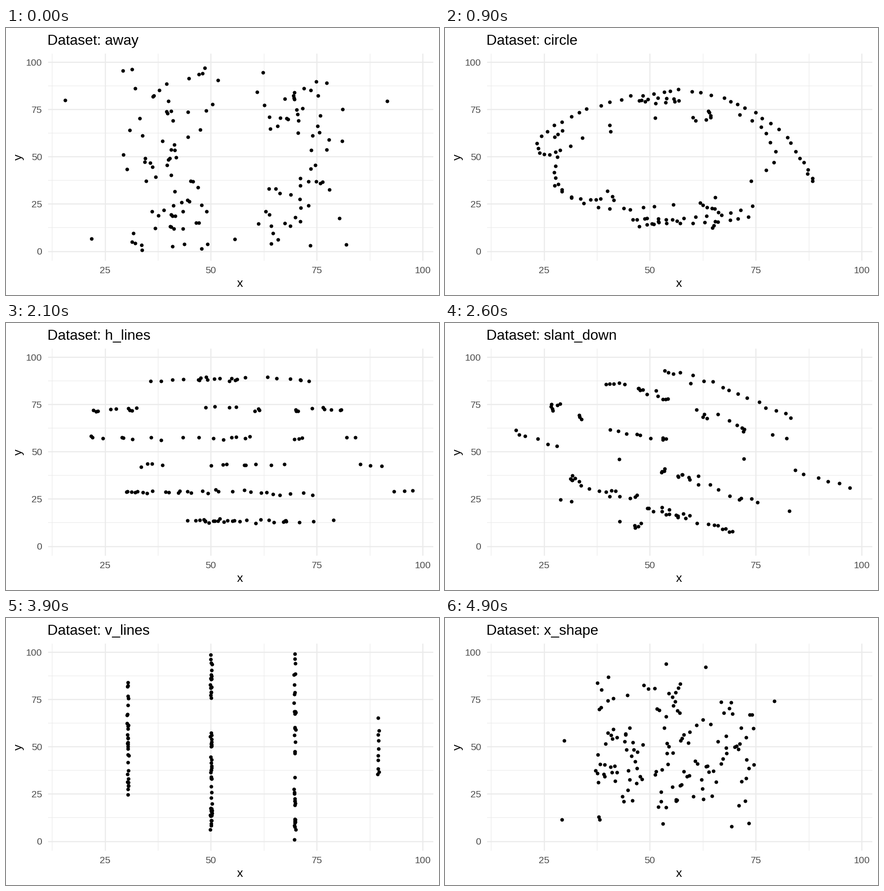
A matplotlib script that plays this animation: 952x588 px, repeating every 5 s.

```python
import numpy as np
import matplotlib.pyplot as plt
from matplotlib.animation import FuncAnimation

W, H, DPI = 952, 588, 100
N = 142
FONT = "Liberation Sans"
rng = np.random.default_rng(7)


def px(x):
    return 217.6 + (np.asarray(x) - 25) * 9.313


def py(y):
    return 491.5 - np.asarray(y) * 4.162


def noise(n, sx, sy):
    return np.clip(rng.normal(size=(n, 2)), -2, 2) * (sx, sy)


def curve(n, *keys):
    """n evenly spaced points on a smooth curve through the key points."""
    keys = np.array(keys, float)
    slope = np.gradient(keys, axis=0)
    t = np.linspace(0, len(keys) - 1, 400)
    i = np.minimum(t.astype(int), len(keys) - 2)
    u = (t - i)[:, None]
    path = (keys[i] * (1 + 2 * u) * (1 - u) ** 2 + slope[i] * u * (1 - u) ** 2
            + keys[i + 1] * u * u * (3 - 2 * u) + slope[i + 1] * u * u * (u - 1))
    dist = np.r_[0, np.hypot(*np.diff(path, axis=0).T).cumsum()]
    at = np.linspace(0, dist[-1], n)
    return np.column_stack([np.interp(at, dist, c) for c in path.T])


def ellipse(n, cx, cy, rx, ry):
    a = np.arange(n) * 2 * np.pi / n
    return np.column_stack([cx + rx * np.cos(a), cy + ry * np.sin(a)])


def make_dino():
    snout = curve(31, (55.4, 97.2), (38.7, 85), (23.2, 66.4), (24, 52.5),
                  (40, 51.4), (58, 57.5), (61.8, 69))
    mouth = curve(6, (57.4, 55.3), (48.2, 38.3))
    jaw = curve(11, (45.4, 36.4), (36, 30.3), (31.5, 37), (38.2, 49))
    arm = curve(21, (29.7, 36), (35, 25.6), (47, 28.5), (56.7, 42.2),
                (67.9, 48), (71.5, 62), (69.5, 69.5))
    eye = ellipse(11, 51.8, 82, 4.8, 4)
    nostril = curve(3, (29.7, 59.9), (31.3, 62.6))
    back = curve(21, (58, 99.5), (68.5, 94), (76, 76.5), (84, 53), (98.2, 33.7))
    belly = curve(6, (56.7, 40.6), (64.4, 24))
    legs = curve(12, (74.4, 22.9), (61.3, 19), (50, 17.7), (45, 13.7))
    toes = curve(4, (48.7, 14.9), (56.2, 14.1))
    claws = curve(4, (52, 12.6), (46.2, 6))
    ground = curve(9, (50.5, 9.8), (78.2, 10.6))
    heel = curve(3, (68, 8.7), (68.2, 2.9))
    return np.vstack([snout, mouth, jaw, arm, eye, nostril, back, belly, legs,
                      toes, claws, ground, heel])


def make_away():
    """Two loose columns around an empty middle, with a few strays."""
    pts = [(15.6, 80), (91.6, 79.4), (21.8, 6.6), (82, 3.5)]
    while len(pts) < N:
        left = rng.random() < 0.55
        x = rng.normal(41, 7) if left else rng.normal(70, 5.5)
        y = rng.uniform(0, 97.5)
        hole = np.hypot((x - 58) / 15, (y - 49) / 17) < 1
        if 28 < x < 82 and not hole:
            pts.append((x, y))
    return rng.permutation(np.array(pts))


def nearest(values, options):
    options = np.asarray(options, float)
    return options[np.abs(values[:, None] - options).argmin(1)]


def ring(pts, small, big):
    d = pts - (54.3, 47.8)
    r = np.hypot(*d.T)
    radius = np.where(r < 28, small, big)
    return (54.3, 47.8) + d * (radius / r)[:, None] + noise(N, 0.5, 0.5)


def dots(pts):
    x, y = pts.T
    cx = np.array([26, 51, 75.5])[np.digitize(x, [37.5, 62])]
    cy = np.array([17, 51, 83])[np.digitize(y, [34, 64])]
    far = np.maximum(y - cy - 7, 0) * (cy > 80)
    return np.column_stack([cx, cy + far]) + noise(N, 0.7, 0.7)


def h_lines(pts):
    x, y = pts.T
    return np.column_stack([x, nearest(y, 10.3 + 20 * np.arange(5))]) + noise(N, 0.8, 0.5)


def v_lines(pts):
    x, y = pts.T
    cols = nearest(x, 30.4 + 19.7 * np.arange(4))
    out = np.column_stack([cols, y]) + noise(N, 0.1, 1.5)
    out[:, 1] = np.minimum(out[:, 1], 99.7)
    return out


def high_lines(pts):
    x, y = pts.T
    band = np.where(y > 50, 70 + (y - 50) * 0.35, 30 - (50 - y) * 0.27)
    return np.column_stack([x, band]) + noise(N, 0.8, 1)


def wide_lines(pts):
    x, y = pts.T
    band = np.where(x < 53, 42 - (53 - x) * 0.42, 64 + (x - 53) * 0.3)
    out = np.column_stack([band, y]) + noise(N, 1.2, 1.5)
    out[:, 1] = np.clip(out[:, 1], 0.2, 99.7)
    return out


def slant(pts, sign, offsets):
    """Drop each point on the closest line y = sign * x + c."""
    x, y = pts.T
    c = nearest(y - sign * x, offsets)
    ny = (y + sign * x + c) / 2
    ny = np.where(ny > 88, 88 + (ny - 88) * 0.75, ny)
    return np.column_stack([sign * (ny - c), ny]) + noise(N, 0.5, 0.8)


def on_segments(pts, a, b, sx, sy):
    """Closest point on any of the segments a-b."""
    d = b - a
    t = ((pts[:, None] - a) * d).sum(2) / (d * d).sum(1)
    near = a + np.clip(t, 0, 1)[..., None] * d
    pick = np.hypot(*np.moveaxis(pts[:, None] - near, 2, 0)).argmin(1)
    return near[np.arange(N), pick] + noise(N, sx, sy)


def star(pts):
    a = np.pi / 2 + np.arange(10) * np.pi / 5
    r = np.where(np.arange(10) % 2, 0.42, 1)
    v = np.column_stack([57 + 31 * r * np.cos(a), 49 + 43 * r * np.sin(a)])
    return on_segments(pts, v, np.roll(v, -1, 0), 0.5, 0.5)


def x_shape(pts):
    a = np.array([[32.0, 93], [32, 5]])
    b = np.array([[78.0, 9], [79, 92]])
    return on_segments(pts, a, b, 1.3, 2)


dino = make_dino()
STATES = [
    ("away", make_away()),
    ("bullseye", ring(dino, 18.7, 37.1)),
    ("circle", ring(dino, 31, 31)),
    ("dino", dino),
    ("dots", dots(dino)),
    ("h_lines", h_lines(dino)),
    ("high_lines", high_lines(dino)),
    ("slant_down", slant(dino, -1, [52, 71, 100, 130, 150])),
    ("slant_up", slant(dino, 1, [-49, -30, 0, 30, 48])),
    ("star", star(dino)),
    ("v_lines", v_lines(dino)),
    ("wide_lines", wide_lines(dino)),
    ("x_shape", x_shape(dino)),
]

fig = plt.figure(figsize=(W / DPI, H / DPI), dpi=DPI, facecolor="white")
ax = fig.add_axes([0, 0, 1, 1])
ax.set(xlim=(0, W), ylim=(H, 0))
ax.axis("off")


def pt(pixels):
    return pixels * 72 / DPI


def label(x, y, text, size, color="black", **kw):
    return ax.text(x, y, text, family=FONT, fontsize=pt(size), color=color, **kw)


def grid(xs, ys, width):
    style = dict(color="#EBEBEB", lw=pt(width), zorder=1)
    ax.vlines(px(xs), 55.8, 512.2, **style)
    ax.hlines(py(ys), 91.5, 938.6, **style)


ticks = np.arange(0, 101, 25)
grid(ticks[:-1] + 12.5, ticks[:-1] + 12.5, 1.28)
grid(ticks[1:], ticks, 2.56)
for v in ticks:
    label(79.3, py(v) + 7.6, str(v), 21.1, "#4D4D4D", ha="right", va="baseline")
    if v:
        label(px(v), 539.7, str(v), 21.1, "#4D4D4D", ha="center", va="baseline")
label(514.8, 570, "x", 26.4, ha="center", va="baseline")
label(28, 284, "y", 26.4, ha="center", va="center", rotation=90)

title = label(91.3, 36.6, "", 31.68, va="baseline")
points, = ax.plot([], [], "o", color="black", ms=pt(8), mew=0, zorder=3)


def locate(frame):
    """Index of the state being left and how far the move has come."""
    if frame == 0:
        return 0, 0.0
    k, step = divmod(frame - 1, 4)
    if k == len(STATES) - 1:
        return k, 0.5
    return k, min((step + 1) / 3, 1.0)


def draw(frame):
    k, p = locate(frame)
    nxt = (k + 1) % len(STATES)
    pos = STATES[k][1] * (1 - p) + STATES[nxt][1] * p
    points.set_data(px(pos[:, 0]), py(pos[:, 1]))
    title.set_text("Dataset: " + STATES[nxt if p > 0.5 else k][0])
    return points, title


anim = FuncAnimation(fig, draw, frames=50, interval=100, repeat=True,
                     repeat_delay=0, init_func=lambda: draw(0), blit=False)
plt.show()
```
